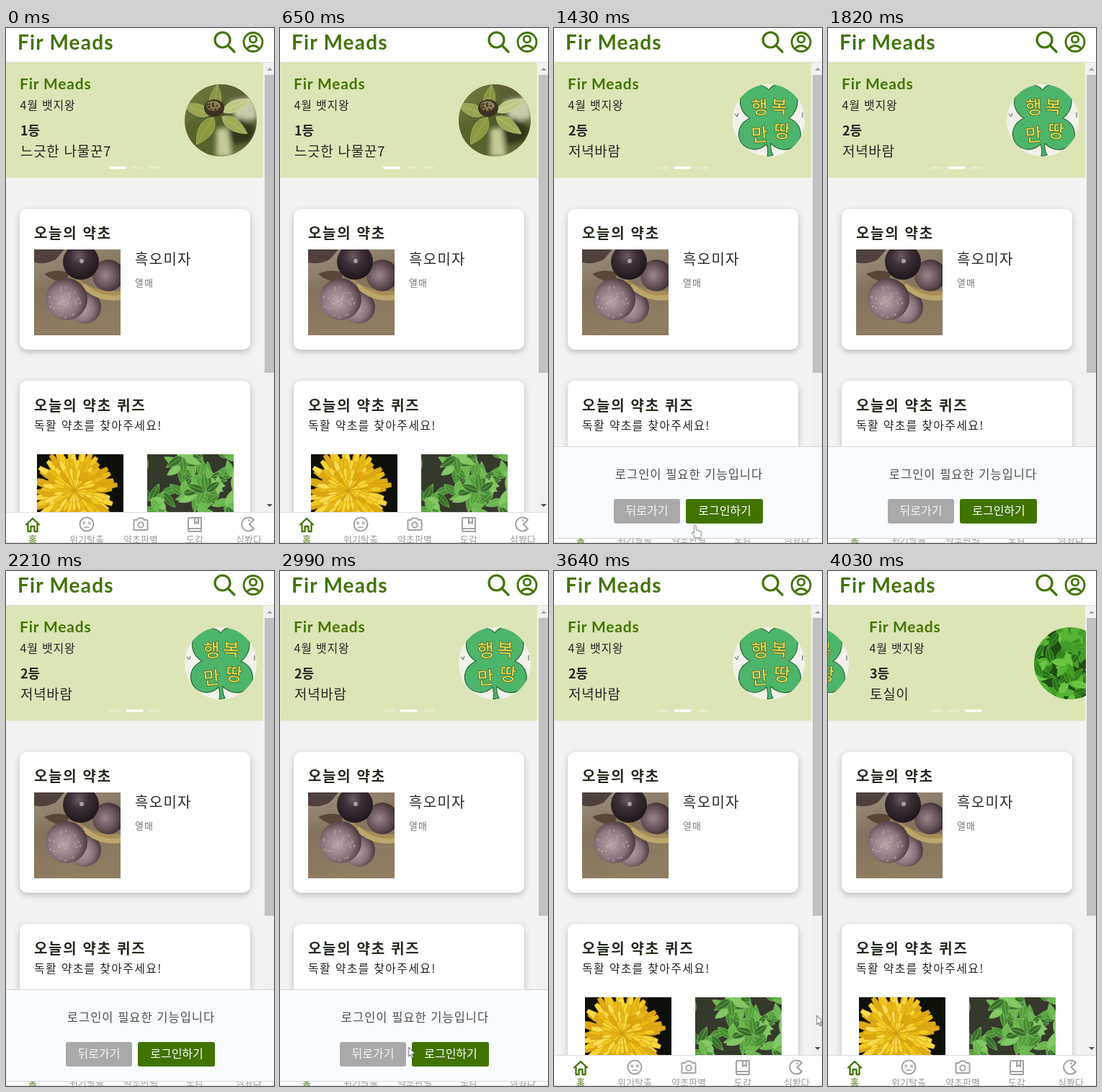
These frames come from a looping animation (372x714 px, 4.16 s). An HTML page:

```html
<!DOCTYPE html>
<html lang="ko">
<head>
<meta charset="utf-8">
<title>오늘의 약초</title>
<style>
html, body { margin: 0; width: 100%; height: 100%; overflow: hidden; background: #fff; }
svg { display: block; }
text { font-family: "Noto Sans CJK KR", "Noto Sans CJK", sans-serif; font-weight: 350; fill: #262626; white-space: pre; }
.brand { font-family: Lato, sans-serif; font-weight: 700; fill: #417505; }
.h { font-size: 20px; font-weight: 700; letter-spacing: 1.7px; fill: #222a1c; }
.bold { font-weight: 700; }
.mid { text-anchor: middle; }
.line { fill: none; stroke: #a2a2a2; stroke-width: 2; stroke-linejoin: round; stroke-linecap: round; }
.card { fill: #fff; filter: drop-shadow(0 3px 4px rgba(0,0,0,.24)); }

/* one loop = 32 ticks of 130 ms, 3.125% each */
#track, #sheet, #hand, #arrow, .dots { animation: 4160ms step-end infinite; }
#track { animation-name: slide; }
#sheet { animation-name: sheet; }
#hand { animation-name: hand; }
#arrow { animation-name: arrow; }
#dots0 { animation-name: first; }
#dots1 { animation-name: second; }
#dots2 { animation-name: third; }

@keyframes slide {
  0% { transform: none; }
  21.875% { transform: translateX(-290px); }
  25% { transform: translateX(-355px); }
  28.125% { transform: translateX(-357px); }
  93.75% { transform: translateX(-453px); }
  96.875%, 100% { transform: translateX(-676px); }
}
@keyframes first { 0% { opacity: 1; } 21.875%, 100% { opacity: 0; } }
@keyframes second { 0% { opacity: 0; } 21.875% { opacity: 1; } 93.75%, 100% { opacity: 0; } }
@keyframes third { 0% { opacity: 0; } 93.75%, 100% { opacity: 1; } }
@keyframes sheet {
  0% { transform: translateY(140px); }
  28.125% { transform: translateY(96px); }
  31.25% { transform: translateY(14px); }
  34.375% { transform: none; }
  78.125% { transform: translateY(40px); }
  81.25%, 100% { transform: translateY(140px); }
}
@keyframes hand {
  0% { transform: translate(400px, 800px); }
  21.875% { transform: translate(197px, 698px); }
  25% { transform: translate(194.5px, 690px); }
  40.625% { transform: translate(196px, 705px); }
  43.75% { transform: translate(400px, 800px); }
  75% { transform: translate(162px, 667px); }
  81.25%, 100% { transform: translate(400px, 800px); }
}
@keyframes arrow {
  0% { transform: translate(400px, 800px); }
  65.625% { transform: translate(184px, 704px); }
  68.75% { transform: translate(181px, 682px); }
  71.875% { transform: translate(178.5px, 660px); }
  75% { transform: translate(400px, 800px); }
  81.25% { transform: translate(186px, 660px); }
  84.375% { transform: translate(295px, 632px); }
  87.5% { transform: translate(364.5px, 616px); }
  90.625%, 100% { transform: translate(400px, 800px); }
}
</style>
</head>
<body>
<svg width="372" height="714" viewBox="0 0 372 714">
  <defs>
    <radialGradient id="berry" cx=".4" cy=".5" r=".62">
      <stop offset="0" stop-color="#9a878c"/><stop offset=".55" stop-color="#66535a"/><stop offset="1" stop-color="#33262b"/>
    </radialGradient>
    <radialGradient id="pale" cx=".42" cy=".55" r=".6">
      <stop offset="0" stop-color="#b9a4a9"/><stop offset=".6" stop-color="#8b757c"/><stop offset="1" stop-color="#45353b"/>
    </radialGradient>
    <radialGradient id="dark" cx=".45" cy=".35" r=".65">
      <stop offset="0" stop-color="#6c5b64"/><stop offset=".4" stop-color="#3d2f37"/><stop offset="1" stop-color="#1e161c"/>
    </radialGradient>
    <linearGradient id="soil" x2=".3" y2="1">
      <stop offset="0" stop-color="#9c9383"/><stop offset=".45" stop-color="#84745e"/><stop offset="1" stop-color="#8e7d60"/>
    </linearGradient>
    <linearGradient id="moss" x2="1" y2="1">
      <stop offset="0" stop-color="#7c8440"/><stop offset=".5" stop-color="#4f5a2a"/><stop offset="1" stop-color="#6d7440"/>
    </linearGradient>
    <filter id="blur"><feGaussianBlur stdDeviation="3"/></filter>
    <clipPath id="round"><circle cx="50" cy="50" r="50"/></clipPath>
    <clipPath id="banner"><rect y="48" width="357.500" height="160"/></clipPath>
  </defs>

  <rect width="372" height="714" fill="#f3f3f3"/>

  <g clip-path="url(#banner)">
    <rect x=".5" y="47.500" width="356.500" height="160" rx="2" fill="#dce5b5" stroke="#e5ebcc"/>
    <g id="track"></g>
    <g id="bullets"></g>
  </g>

  <rect class="card" x="19" y="251" width="320" height="195" rx="10"/>
  <text class="h" x="39" y="292">오늘의 약초</text>
  <svg x="39" y="307" width="120" height="119">
    <rect width="120" height="119" fill="url(#soil)"/>
    <path d="M0 0H42L30 14Q14 22 0 18Z" fill="#4f413d"/>
    <path d="M14 34Q30 26 48 32L46 46Q28 46 14 34Z" fill="#594638"/>
    <path d="M58 44Q84 66 122 62" fill="none" stroke="#a98d58" stroke-width="9"/>
    <circle cx="103" cy="36" r="22" fill="url(#berry)"/>
    <circle cx="70" cy="80" r="23" fill="url(#pale)"/>
    <circle cx="65" cy="17" r="25" fill="url(#dark)"/>
    <path d="M68 50Q92 72 122 66" fill="none" stroke="#bda66b" stroke-width="7"/>
    <circle cx="45" cy="69" r="29" fill="url(#pale)"/>
    <g id="specks" fill="#d8c9c9" opacity=".5"></g>
    <circle cx="66" cy="16" r="3" fill="#aaa0a6"/>
  </svg>
  <text x="179" y="327.500" font-size="20" letter-spacing="1.3">흑오미자</text>
  <text x="179" y="358" font-size="13" letter-spacing="1" style="fill:#777">열매</text>

  <rect class="card" x="19" y="489" width="320" height="240" rx="10"/>
  <text class="h" x="39" y="530.500">오늘의 약초 퀴즈</text>
  <text x="39" y="557" font-size="16" letter-spacing="1.25">독활 약초를 찾아주세요!</text>
  <svg x="43" y="591" width="120" height="80"><rect width="120" height="80" fill="#0d0f08"/><g id="flower"></g></svg>
  <svg x="196" y="591" width="120" height="80"><rect width="120" height="80" fill="#35392b"/><g id="herb"></g></svg>

  <rect x="358" y="48" width="14" height="623" fill="#f1f1f1"/>
  <rect x="359" y="65" width="13" height="413" fill="#c1c1c1"/>
  <path d="M362 59l4-4 4 4z" fill="#a3a3a3"/>
  <path d="M362 660l4 4 4-4z" fill="#505050"/>

  <rect width="372" height="47" fill="#fff"/>
  <path d="M0 47.500H372" stroke="#dcdcdc"/>
  <text class="brand" x="16" y="30" font-size="28" letter-spacing="1.2">Fir Meads</text>
  <g fill="none" stroke="#417505" stroke-width="3.200" stroke-linecap="round">
    <circle cx="300.500" cy="16.500" r="10.500"/><path d="M308.500 24.500L317 33"/>
    <g stroke-width="2.800"><circle cx="343" cy="19.500" r="13"/><circle cx="343" cy="15.500" r="4.700"/><path d="M334.500 28.500Q343 20.500 351.500 28.500"/></g>
  </g>

  <rect y="671" width="372" height="43" fill="#fff"/>
  <path d="M0 671.500H372M0 713.500H372" stroke="#dcdcdc"/>
  <g id="labels"></g>
  <g class="line">
    <path stroke="#417505" stroke-width="2.300" d="M28 688.500L37 680L46 688.500M30.500 687.500V698H34.500V691H39.500V698H43.500V687.500"/>
    <circle cx="112" cy="688" r="9.500"/>
    <path stroke-width="1.500" d="M107 685l2.500 2.500m0-2.500l-2.500 2.500M114.500 685l2.500 2.500m0-2.500l-2.500 2.500M109 692.500l1.500-1 1.500 1 1.500-1 1.500 1"/>
    <path d="M178.500 682H182L184 679.500H190L192 682H195.500Q196.500 682 196.500 683V695Q196.500 696 195.500 696H178.500Q177.500 696 177.500 695V683Q177.500 682 178.500 682Z"/>
    <circle cx="187" cy="689" r="3.700"/>
    <path d="M255 679H271V698H255Q253 698 253 696V681Q253 679 255 679ZM254 694H271M262 679V687L264.500 685L267 687V679"/>
    <path d="M344 682A9.500 9.500 0 1 0 344 694L337.500 688Z"/>
    <circle cx="337.500" cy="682.500" r=".5"/>
  </g>

  <g id="sheet">
    <rect y="580" width="372" height="128" fill="#f9fcff"/>
    <path d="M0 580.500H372M0 707.500H372" stroke="#d4d6d8"/>
    <text class="mid" x="187.500" y="625" font-size="16.500" letter-spacing="1" style="fill:#4c4c4c">로그인이 필요한 기능입니다</text>
    <rect x="83" y="653" width="92" height="34" rx="3" fill="#a9a9a9"/>
    <rect x="183" y="653" width="107" height="34" rx="3" fill="#417300"/>
    <text class="mid" x="129" y="675" font-size="16" style="fill:#f4f4f4">뒤로가기</text>
    <text class="mid" x="237" y="675" font-size="16" style="fill:#fff">로그인하기</text>
  </g>

  <path id="hand" fill="#fff" stroke="#777" stroke-linejoin="round" d="M0 1.500Q0-.5 1.500-.5T3 1.500V6.500Q5 5.500 5.500 7 7.500 6.200 8 8 10 7.500 10 9.500V12Q10 14 8.500 17H1Q0 14-3.500 10.500-3.500 8.500-1.500 9L0 10.500Z"/>
  <path id="arrow" fill="#fff" stroke="#555" stroke-linejoin="round" d="M0 0V13L3 10.500 5 15 7 14 5 9.500H9Z"/>
</svg>
<script>
const $ = id => document.getElementById(id);

let seed = 7;
const rnd = (a = 0, b = 1) => {
  seed = (seed * 16807) % 2147483647;
  return a + (b - a) * seed / 2147483647;
};
const pick = list => list[Math.floor(rnd(0, list.length))];
const repeat = (n, fn) => Array.from({ length: n }, (_, i) => fn(i)).join('');
const fix = n => n.toFixed(1);
const place = (x, y, turn) => `transform="translate(${fix(x)} ${fix(y)}) rotate(${fix(turn)})"`;

// pointed leaf growing from x, y
const leaf = (x, y, len, wide, turn, fill, vein) =>
  `<path ${place(x, y, turn)} fill="${fill}" stroke="${vein}" stroke-width=".6"
   d="M0 0C${fix(len * .2)} ${-wide} ${fix(len * .6)} ${-wide} ${len} 0C${fix(len * .6)} ${wide} ${fix(len * .2)} ${wide} 0 0H${len}"/>`;

const foliage = (n, w, h, colors, vein, size) => repeat(n, () => {
  const x = rnd(-5, w + 5), y = rnd(-5, h + 5), turn = rnd(0, 360);
  return repeat(3, i => leaf(x, y, Math.round(size * rnd(.75, 1.1)), Math.round(size * .28), turn + (i - 1) * 62, pick(colors), vein));
});

$('herb').innerHTML = foliage(32, 120, 80, ['#549f3b', '#69b74c', '#468c31', '#82c864', '#376f29'], '#8cc670', 26);

// blunt petal, widest near its tip
const petal = (len, wide, turn, fill) =>
  `<path ${place(52, 50, turn)} fill="${fill}" stroke="#c8940c" stroke-width=".5" d="M0 0L${len * .8} ${-wide}L${len} ${-wide * .6}V${wide * .6}L${len * .8} ${wide}Z"/>`;
const yellows = ['#f3c91f', '#e8b915', '#f8d63a', '#dda812', '#fadd4e'];
const ring = (n, len, wide) => repeat(n, i =>
  petal(Math.round(len * rnd(.88, 1.08)), wide, i * 360 / n + rnd(-4, 4), pick(yellows)));
$('flower').innerHTML = ring(40, 56, 4.5) + ring(34, 43, 3.6) + ring(28, 30, 2.8) + ring(20, 17, 2.2);

$('specks').innerHTML = repeat(40, () => {
  const a = rnd(0, 6.28), r = 23 * Math.sqrt(rnd());
  return `<circle cx="${fix(42 + r * Math.cos(a))}" cy="${fix(72 + r * Math.sin(a))}" r="${fix(rnd(.5, 1.4))}"/>`;
});

const bug = `<rect width="100" height="100" fill="url(#moss)"/>
  <g filter="url(#blur)">
    <path d="M40 0H100V22Q70 30 40 0Z" fill="#5f5f36"/>
    <path d="M62 24L100 18V48L72 52Z" fill="#c9cba6"/>
    <path d="M58 58L78 46 100 62 92 80 66 84Z" fill="#323817"/>
    <path d="M0 52L34 58 40 100H0Z" fill="#56632c"/>
    <path d="M44 62L60 60 66 100H44Z" fill="#c5c995"/>
  </g>` +
  leaf(36, 42, 40, 11, 200, '#9aa452', '#b7bf7c') + leaf(40, 40, 40, 11, -82, '#8a9543', '#b0ba72') +
  leaf(52, 38, 42, 10, -24, '#c0c684', '#dde0b8') + leaf(40, 46, 44, 13, 122, '#8c983f', '#b2bc72') +
  leaf(52, 45, 42, 11, 34, '#a0ab57', '#c6cd92') +
  `<ellipse cx="41" cy="33" rx="14" ry="12" fill="#39321f"/><ellipse cx="40" cy="30" rx="10" ry="7" fill="#8a7c53"/>` +
  repeat(14, () => `<circle cx="${fix(rnd(32, 50))}" cy="${fix(rnd(26, 40))}" r="1.3" fill="#3a3119"/>`);

const glyph = (ch, x, y, turn) =>
  `<text class="mid" ${place(x, y, turn)} font-size="25"
   style="font-weight:500;fill:#ece04f;stroke:#4f6a30;stroke-width:1.6px;paint-order:stroke">${ch}</text>`;
const clover = `<rect width="100" height="100" fill="#f1f2e9"/>
  <path d="M50 8C60-7 90-3 90 20C91 34 84 43 78 47C94 53 100 72 88 84C77 95 62 91 53 82Q52 92 56 98L48 100Q50 91 47 83C36 94 20 92 12 81C4 68 10 53 24 47C12 40 7 26 13 13C21-2 42-2 50 8Z"
   fill="#4db56a" stroke="#2b6a3b" stroke-width="1.2"/>
  <path d="M3 41l3 4 2-5M97 39v7" fill="none" stroke="#555"/>` +
  glyph('행', 38, 41, -3) + glyph('복', 64, 40, 3) + glyph('만', 38, 79, -4) + glyph('땅', 68, 74, 3);

const bush = '<rect width="100" height="100" fill="#1f4d14"/>' +
  foliage(38, 100, 100, ['#3e9a22', '#56b332', '#2f821b', '#6cc744', '#25701a'], '#5fb53c', 25);

const slides = [['1등', '느긋한 나물꾼7', bug], ['2등', '저녁바람', clover], ['3등', '토실이', bush]];
$('track').innerHTML = slides.map(([rank, who, art], i) => `<g transform="translate(${i * 357} 0)">
  <text class="brand" x="19" y="85" font-size="21" letter-spacing=".8">Fir Meads</text>
  <text x="19.500" y="113" font-size="16" letter-spacing=".8">4월 뱃지왕</text>
  <text class="bold" x="20" y="149" font-size="18">${rank}</text>
  <text x="20" y="178" font-size="19" letter-spacing=".7">${who}</text>
  <g transform="translate(248 78)"><g clip-path="url(#round)">${art}</g></g></g>`).join('');

$('bullets').innerHTML = repeat(3, on => {
  let x = 143;
  return `<g class="dots" id="dots${on}">` + repeat(3, i => {
    const w = i === on ? 24 : 15.5, at = x;
    x += w + 8;
    return `<rect x="${at}" y="192" width="${w}" height="3.5" rx="1.7" fill="#fff" opacity="${i === on ? 1 : .3}"/>`;
  }) + '</g>';
});

$('labels').innerHTML = ['홈', '위기탈출', '약초판별', '도감', '심봤다'].map((s, i) =>
  `<text class="mid" x="${37 + 75 * i}" y="713.500" font-size="13" style="fill:${i ? '#999' : '#417505'}">${s}</text>`).join('');
</script>
</body>
</html>
```
